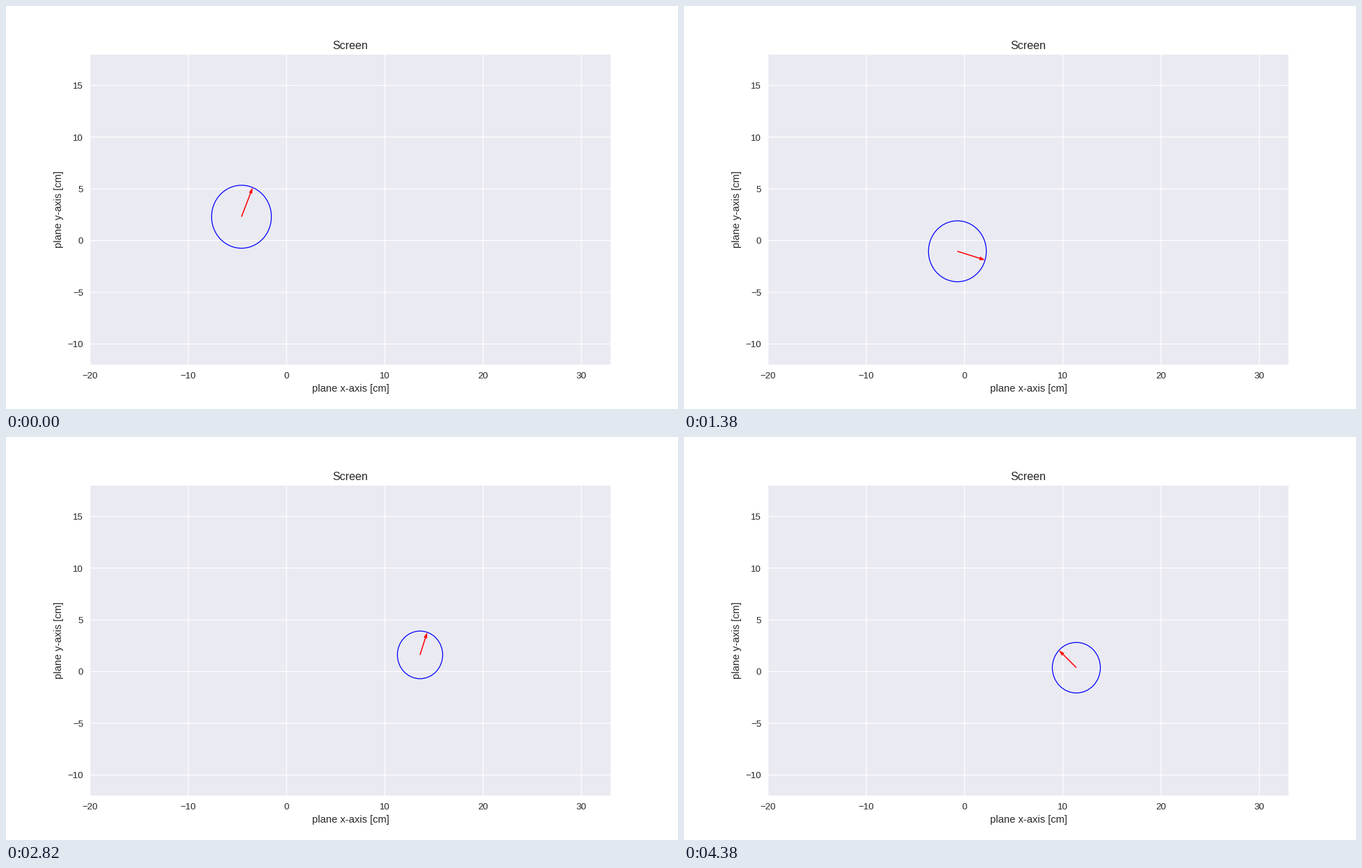
Write a matplotlib script that moves like this. It is 966 px wide and 580 px high and loops after 6.16 s.

```python
import numpy as np
import matplotlib.pyplot as plt
from matplotlib.animation import FuncAnimation
from matplotlib.patches import Circle, Polygon

W, H, DPI = 966, 580, 100
X_MIN, X_MAX, Y_MIN, Y_MAX = -20, 33, -12, 18
TICK_MS, LOOP_MS, STEP_MS = 20, 6160, 60
LAST_STEP = 73
INK = "#262626"
ZOOM = 0.966  # scales the point sizes of text

plt.rcParams["font.family"] = "Liberation Sans"
fig = plt.figure(figsize=(W / DPI, H / DPI), dpi=DPI, facecolor="white")
ax = fig.add_axes([0.125, 0.11, 0.775, 0.77], facecolor="#EAEAF2")
ax.set(xlim=(X_MIN, X_MAX), ylim=(Y_MIN, Y_MAX), xticks=[], yticks=[])
for spine in ax.spines.values():
    spine.set_visible(False)

ORIGIN = np.array([0.125 * W, 0.89 * H])
SCALE = np.array([0.775 * W / (X_MAX - X_MIN), 0.77 * H / (Y_MAX - Y_MIN)])
FLIP = np.array([1, -1])


def label(x, y, text, size, **kw):
    """Text at a pixel position measured from the top left."""
    fig.text(x / W, 1 - y / H, text, fontsize=size * ZOOM, color=INK, **kw)


def tick_text(value):
    return str(value).replace("-", "\u2212")


grid = dict(color="white", lw=0.85, snap=False, zorder=1)
for x in range(-20, 31, 10):
    ax.plot([x, x], [Y_MIN, Y_MAX], **grid)
    label(ORIGIN[0] + (x - X_MIN) * SCALE[0], 536.2, tick_text(x), 10, ha="center")
for y in range(-10, 16, 5):
    ax.plot([X_MIN, X_MAX], [y, y], **grid)
    label(111.2, ORIGIN[1] - (y - Y_MIN) * SCALE[1] + 4.9, tick_text(y), 10, ha="right")

CENTER_X = ORIGIN[0] + 0.775 * W / 2
label(CENTER_X, 61.6, "Screen", 12, ha="center")
label(CENTER_X, 555, "plane x-axis [cm]", 11, ha="center")
label(76, 293, "plane y-axis [cm]", 11, ha="center", va="center", rotation=90)

# Key points of the centre: step, pixel position, pixel velocity per step
KEYS = np.array([
    (0, 338.5, 303.3, 2.3, -6),
    (8, 349.5, 324, 3.4, 2.1),
    (12, 360, 329, -4, -2),
    (23, 393, 353, 5.7, 1.8),
    (27, 418, 342, 18, -4),
    (29, 469.4, 327.7, 26.8, -7.8),
    (38, 575, 308, 5.4, -0.1),
    (45, 595, 314, 0, 0),
    (56, 589.7, 314.8, -2.1, 1.75),
    (66, 588, 314, -2, 0),
    (LAST_STEP, 564, 332, -2, -2),
])


def motion(step):
    """Position and velocity on the cubic through the neighbouring keys."""
    k = min(np.searchsorted(KEYS[:, 0], step, side="right"), len(KEYS) - 1)
    a, b = KEYS[k - 1], KEYS[k]
    span = b[0] - a[0]
    u = (step - a[0]) / span
    p, q, v, w = a[1:3], b[1:3], a[3:], b[3:]
    ease = u * u * (3 - 2 * u)
    position = p + (q - p) * ease + span * u * (1 - u) * ((1 - u) * v - u * w)
    velocity = (6 * u * (1 - u) * (q - p) / span
                + (1 - u) * (1 - 3 * u) * v + u * (3 * u - 2) * w)
    return position, velocity


circle = ax.add_patch(Circle((0, 0), 1, fill=False, ec="blue", lw=0.9, zorder=3))
shaft, = ax.plot([], [], color="red", lw=1.1, solid_capstyle="butt", zorder=4)
head = ax.add_patch(Polygon(np.zeros((3, 2)), fc="red", ec="none", zorder=4))


def update(frame):
    position, velocity = motion(min(frame * TICK_MS // STEP_MS, LAST_STEP))
    center = (position - ORIGIN) * FLIP / SCALE + (X_MIN, Y_MIN)
    # The radius grows with the square of the speed
    radius = 2.3 + 0.018 * velocity @ velocity
    along = velocity * FLIP / SCALE
    along = along / max(np.hypot(*along), 1e-9)
    across = np.array([-along[1], along[0]])
    tip = center + radius * along
    base = tip - 0.58 * along
    circle.center = center
    circle.set_radius(radius)
    shaft.set_data([center[0], base[0]], [center[1], base[1]])
    head.set_xy([tip, base + 0.18 * across, base - 0.18 * across])
    return circle, shaft, head


anim = FuncAnimation(fig, update, frames=LOOP_MS // TICK_MS, interval=TICK_MS,
                     repeat=True, repeat_delay=0)
plt.show()
```
